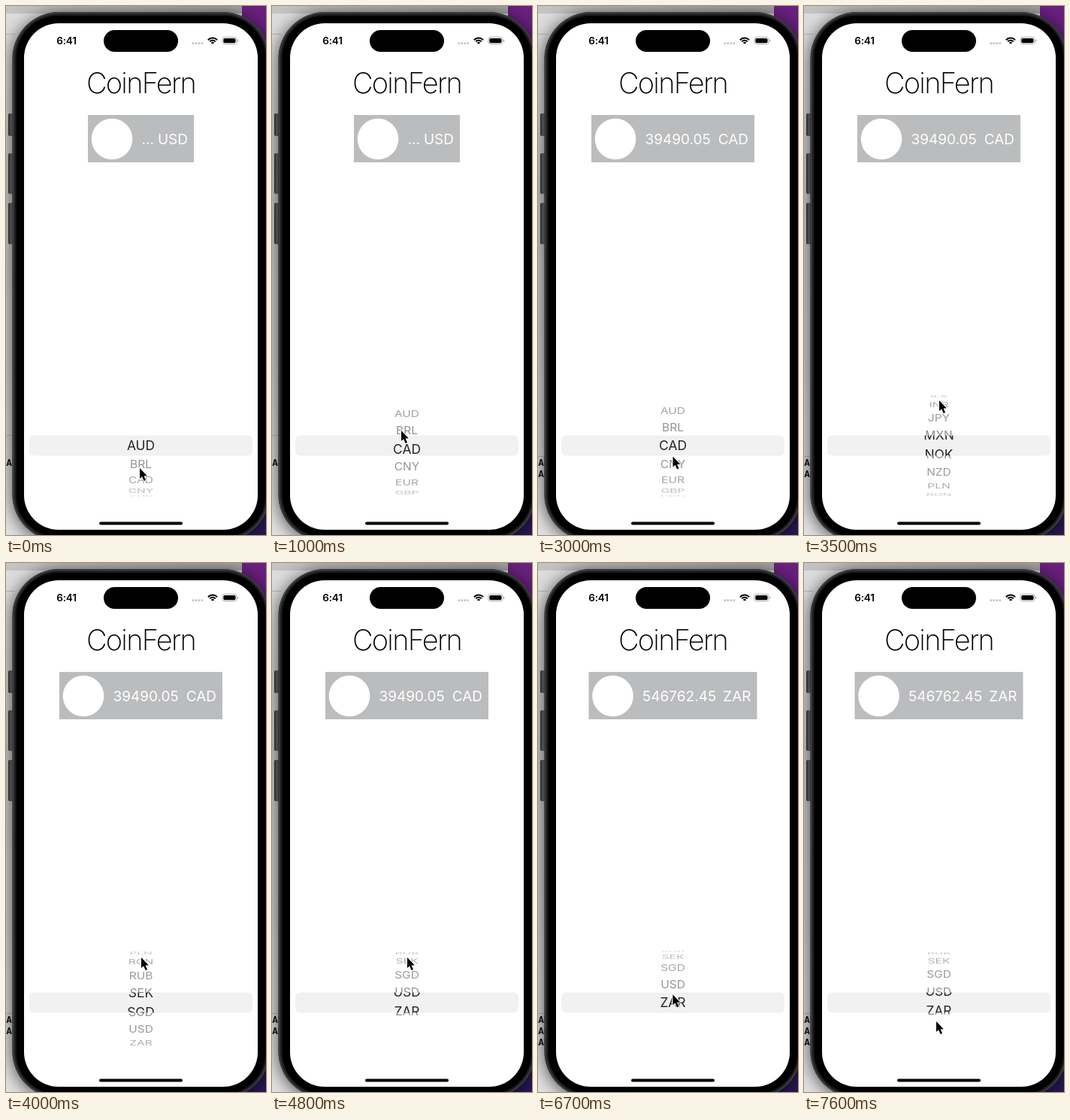
Animation of 346 by 704 pixels, one loop 8 s. Source, as an HTML page with a canvas:

```html
<!DOCTYPE html>
<html lang="en">
<head>
<meta charset="utf-8">
<title>Currency picker</title>
<style>
  html, body { margin: 0; width: 100%; height: 100%; overflow: hidden; background: #fff; }
  canvas { display: block; width: 346px; height: 704px; }
</style>
</head>
<body>
<canvas id="stage"></canvas>
<script>
const W = 346, H = 704, LOOP = 8000, STEP = 100;
const canvas = document.getElementById('stage');
const ctx = canvas.getContext('2d');
const dpr = window.devicePixelRatio || 1;
canvas.width = W * dpr;
canvas.height = H * dpr;

const SANS = 'Inter, Roboto, "Liberation Sans", sans-serif';
const MONO = '"Liberation Mono", "DejaVu Sans Mono", monospace';
const CODES = 'AUD BRL CAD CNY EUR GBP HKD IDR ILS INR JPY MXN NOK NZD PLN RON RUB SEK SGD USD ZAR'.split(' ');
const ARROW = new Path2D('M0 0V14L3.1 11.3 5.6 17 8 16 5.6 10.4 9.8 10.2Z');

const MID_X = 179.5, MID_Y = 585;
const DRUM = { radius: 68, angle: 0.37 };
const LENS = { x: 31, y: 571.5, w: 297, h: 27 };

// Moments at which the picker lands and at which a price arrives
const FIRST_PICK = 1200, FIRST_PRICE = 1500;
const SECOND_PICK = 5400, SECOND_PRICE = 5800;
const FLICK = 3000;

function ease(t, from, to) {
  const k = Math.min(1, Math.max(0, (t - from) / (to - from)));
  return k * k * (3 - 2 * k);
}

// Fast start, long friction tail; ends when the finger catches the wheel
function spin(t) {
  const u = Math.min(1.8, Math.max(0, (t - FLICK) / 1000)) * 3.6;
  return 1 - (1 + u) * Math.exp(-u);
}

function rowAt(t) {
  const drag = 1.84 * ease(t, 200, 1000) + 0.16 * ease(t, 1000, FIRST_PICK);
  const flick = t < SECOND_PICK ? 17.75 * spin(t) : 18;
  const tug = 0.3 * ease(t, 5900, 6200) * (1 - ease(t, 6200, 6500));
  return drag + flick - tug - 0.43 * ease(t, 7100, 7600);
}

function pointerAt(t) {
  const drag = ease(t, 200, 1000), back = ease(t, 1800, 2300), away = ease(t, 6600, 7000);
  return {
    x: 178 - 6 * drag + 7.5 * back - 4 * away + 0.5 * ease(t, FLICK, 3400),
    y: 615 - 50 * drag + 46 * back - 11.5 * ease(t, 2500, 2700) - 74.5 * ease(t, FLICK, 3400)
      + 46 * ease(t, 5900, 6500) + 21 * away + 18 * ease(t, 7100, 7600)
  };
}

function quoteAt(t) {
  if (t < FIRST_PRICE) return { amount: '...', code: 'USD', w: 141 };
  if (t < SECOND_PRICE) return { amount: '39490.05', code: 'CAD', w: 217 };
  return { amount: '546762.45', code: 'ZAR', w: 224 };
}

function box(x, y, w, h, r, fill) {
  ctx.beginPath();
  ctx.roundRect(x, y, w, h, r);
  ctx.fillStyle = fill;
  ctx.fill();
}

function disc(x, y, r, fill) {
  ctx.beginPath();
  ctx.arc(x, y, r, 0, Math.PI * 2);
  ctx.fillStyle = fill;
  ctx.fill();
}

function label(str, x, y, font, fill, align = 'left', spacing = 0) {
  ctx.font = font;
  ctx.fillStyle = fill;
  ctx.textAlign = align;
  ctx.letterSpacing = spacing + 'px';
  ctx.fillText(str, x, y);
}

function clipped(rects, paint) {
  ctx.save();
  ctx.beginPath();
  rects.forEach(r => ctx.rect(...r));
  ctx.clip();
  paint();
  ctx.restore();
}

function gradient(x0, y0, x1, y1, ...colors) {
  const g = ctx.createLinearGradient(x0, y0, x1, y1);
  colors.forEach((c, i) => g.addColorStop(i / (colors.length - 1), c));
  return g;
}

function drawDesktop(t) {
  box(0, 0, W, H, 0, gradient(0, 0, 0, H, '#dedede', '#c9c9c9', '#cecece', '#e2e2e2'));
  box(0, 0, 314, 10, 0, gradient(0, 0, 314, 0, '#c4c4c4', '#a4a4a4'));
  box(314, 0, 32, H, 0, gradient(0, 0, 0, H, '#6a2080', '#281858'));

  box(0, 37, 12, 1, 0, '#b4b4b4');
  box(0, t < FIRST_PICK ? 571 : 599, 12, 1, 0, '#b4b4b4');
  const lines = 1 + (t >= FIRST_PICK) + (t >= SECOND_PICK);
  for (let i = 0; i < lines; i++) {
    label('AP', 0.5, 612 + i * 15, 'bold 12px ' + MONO, '#111');
  }
}

function drawPhone() {
  ctx.save();
  ctx.shadowColor = 'rgba(0,0,0,.65)';
  ctx.shadowBlur = 22 * dpr;
  ctx.shadowOffsetY = 3 * dpr;
  box(8.5, 8, 342, 704, 62, '#3a3b3d');
  ctx.restore();

  const metal = gradient(3, 0, 10, 0, '#27282a', '#505153', '#2c2d2f');
  box(3, 143, 7, 30, 2, metal);
  box(3, 196, 7, 54, 2, metal);
  box(3, 262, 7, 55, 2, metal);

  box(8.5, 8, 342, 704, 62, '#38393b');
  box(11, 10.5, 337, 699, 59, '#1c1c1e');
  box(13.5, 13, 332, 694, 56, '#000');
  box(24, 23, 311, 674, 46, '#fff');
}

function drawStatus() {
  label('6:41', 80.5, 51, '600 13.5px ' + SANS, '#000', 'center', -0.2);
  box(130, 32, 99, 29, 14.5, '#000');
  for (let i = 0; i < 4; i++) disc(248.8 + i * 4, 49.7, 1.4, '#bfbfc1');

  ctx.lineWidth = 2;
  ctx.strokeStyle = '#000';
  for (let r = 2; r < 9; r += 3.2) {
    ctx.beginPath();
    ctx.arc(275, 51, r, -Math.PI * 0.76, -Math.PI * 0.24);
    ctx.stroke();
  }

  ctx.lineWidth = 0.9;
  ctx.strokeStyle = '#a5a5a5';
  ctx.beginPath();
  ctx.roundRect(287.8, 41.4, 19.2, 9.4, 3);
  ctx.stroke();
  box(289.3, 42.9, 16.2, 6.4, 1.8, '#000');
  box(308, 44.5, 1.2, 3.2, 0.6, '#a5a5a5');
}

function drawQuote({ amount, code, w }) {
  const x = MID_X - w / 2, font = '400 19px ' + SANS;
  box(x, 145, w, 63, 0, '#bbbcbe');
  disc(x + 32, 177, 27.3, '#fff');
  label(amount, x + 71.5, 183.5, font, '#fff');
  label(code, x + w - 8, 183.5, font, '#fff', 'right');
}

function drawRows(row, size, zoom, shade) {
  CODES.forEach((code, i) => {
    const a = (i - row) * DRUM.angle;
    if (Math.abs(a) > 1.52) return;
    ctx.save();
    ctx.translate(MID_X, MID_Y + DRUM.radius * Math.sin(a) * zoom);
    ctx.scale(1, Math.cos(a));
    label(code, 0, size * 0.364, `400 ${size}px ${SANS}`, shade(Math.cos(a)), 'center');
    ctx.restore();
  });
}

// The wheel is drawn twice: pale around the lens, dark and larger inside it
function drawPicker(row) {
  const { x, y, w, h } = LENS;
  box(x, y, w, h, 6, '#f1f1f2');
  clipped([[x, y - 70, w, 70], [x, y + h, w, 70]], () =>
    drawRows(row, 15.5, 1, depth => `rgba(0,0,0,${0.13 + 0.32 * depth})`));
  clipped([[x, y, w, h]], () => drawRows(row, 17.4, 1.04, () => '#242426'));
}

function drawPointer({ x, y }) {
  ctx.save();
  ctx.translate(x, y);
  ctx.lineJoin = 'round';
  ctx.lineWidth = 2;
  ctx.strokeStyle = '#fff';
  ctx.stroke(ARROW);
  ctx.fillStyle = '#000';
  ctx.fill(ARROW);
  ctx.restore();
}

function draw(t) {
  ctx.setTransform(dpr, 0, 0, dpr, 0, 0);
  drawDesktop(t);
  drawPhone();
  drawStatus();
  label('CoinFern', MID_X, 116, '200 38px ' + SANS, '#000', 'center', -1.7);
  drawQuote(quoteAt(t));
  drawPicker(rowAt(t));
  box(124, 686.5, 111, 4, 2, '#000');
  drawPointer(pointerAt(t));
}

const start = performance.now();
function tick() {
  const t = (performance.now() - start) % LOOP;
  draw(Math.floor(t / STEP) * STEP);
  requestAnimationFrame(tick);
}
tick();
</script>
</body>
</html>
```
